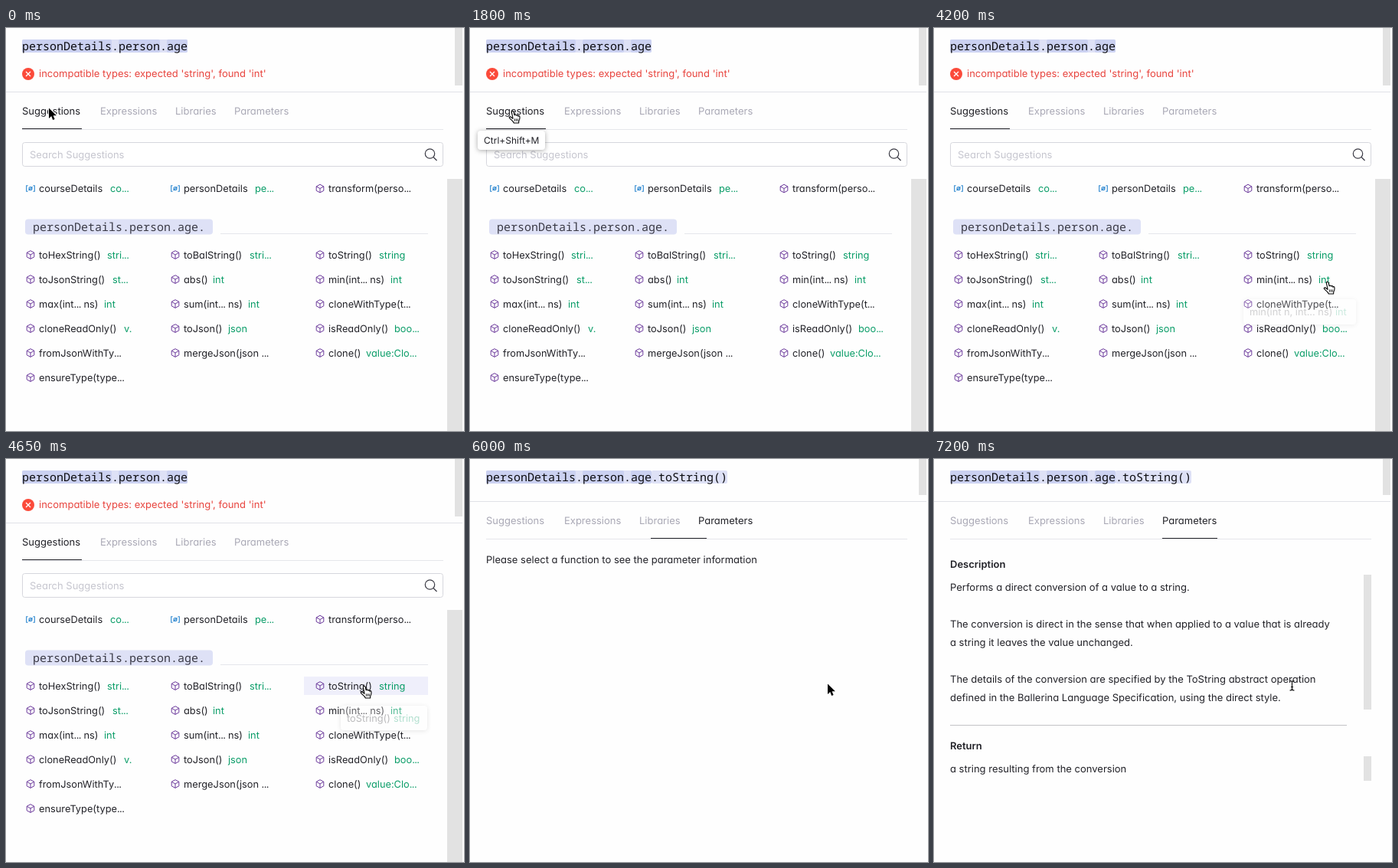
Recreate the animation shown at these times as an HTML page. Size 598 by 526 pixels, loop 8 s.

```html
<!DOCTYPE html>
<html lang="en">
<head>
<meta charset="utf-8">
<style>
  html, body { margin: 0; width: 100%; height: 100%; overflow: hidden; background: #fefefe; }
  svg { display: block; width: 598px; height: 526px; }
  text { font: 13px Inter, sans-serif; font-feature-settings: "cv11"; fill: #222228; white-space: pre; text-rendering: geometricPrecision; }
  .mono { font: 500 15px "Noto Sans Mono", monospace; fill: #0c0c10; }
  .chip { font-weight: 400; fill: #3a3a46; }
  .item { font-size: 12.8px; }
  .dots { letter-spacing: -.6px; }
  .type { fill: #0a9d68; }
  .bold { font-weight: 600; }
  .error { fill: #e8443e; }
  .search { fill: #c6c6cf; }
  .keys { font-size: 12px; }
  .tab { fill: #a9a8b5; }
  .tab.on { fill: #222228; }
  .bar { fill: #e2e2e2; }
  .rule { fill: #e5e6eb; }
  .light { fill: #dee1f6; }
  .dark { fill: #cbd1f1; }
  .hover { fill: #e2e3fa; }
  .cube { fill: none; stroke: #6c3a9c; stroke-linejoin: round; }
  .var { fill: none; stroke: #2b86cf; stroke-width: 1.1; }
  .tip rect { fill: #fff; filter: drop-shadow(0 1px 3px #0005); }
</style>
</head>
<body>
<svg id="stage"></svg>
<script>
const LOOP = 8000;
const COLUMNS = [32, 221, 410];
const HOVER_OPACITY = .52;

// name, type, x of the type
const VARIABLES = [["courseDetails", "co...", 136], ["personDetails", "pe...", 325], ["transform(perso..."]];
const METHODS = [
  ["toHexString()", "stri...", 132], ["toBalString()", "stri...", 318], ["toString()", "string", 487],
  ["toJsonString()", "st...", 139], ["abs()", "int", 270], ["min(int... ns)", "int", 502],
  ["max(int... ns)", "int", 128], ["sum(int... ns)", "int", 316], ["cloneWithType(t..."],
  ["cloneReadOnly()", "v.", 154], ["toJson()", "json", 290], ["isReadOnly()", "boo...", 507],
  ["fromJsonWithTy..."], ["mergeJson(json ..."], ["clone()", "value:Clo...", 470],
  ["ensureType(type..."]
];
const TABS = [["Suggestions", 21], ["Expressions", 123], ["Libraries", 221], ["Parameters", 298]];

// Step tracks: [start time, values...]
const CURSOR = [
  [0, "arrow", 56, 104.5], [600, "hand", 51, 106], [1800, "hand", 50, 107], [1950, "hand", 49, 109],
  [2700, "hand", 49, 110], [2850, "hand", 45, 113], [3000, "hand", 43, 116], [3150, "hand", 42, 116],
  [3900, "hand", 175, 141], [4050, "hand", 496, 314], [4200, "hand", 508, 330], [4350, "hand", 495, 325],
  [4500, "hand", 466, 299], [4650, "hand", 462, 295], [5850, "arrow", 467, 293.5], [7050, "beam", 467.5, 289]
];
const FADES = {
  keysTip: [[0, 0], [750, .3], [900, 1], [4050, .5], [4200, 0]],
  minTip: [[0, 0], [4200, .2], [4350, 1], [4650, 0]],
  stringTip: [[0, 0], [4650, .3], [4800, 1], [6000, 0]],
  minHover: [[0, 0], [4350, 1], [4650, 0]],
  stringHover: [[0, 0], [4650, 1], [5250, 1.6], [5400, 1], [6000, 0]],
  list: [[0, 1], [6000, 0]],
  call: [[0, 0], [6000, 1]],
  hint: [[0, 0], [6000, 1], [7200, 0]],
  details: [[0, 0], [7200, 1]]
};
const UNDERLINE = [[0, 21, 78], [6000, 236, 73], [6150, 298, 72]];

const text = (x, y, s, cls = "") => `<text x="${x}" y="${y}" class="${cls}">${s}</text>`;
const rect = (x, y, w, h, attrs) => `<rect x="${x}" y="${y}" width="${w}" height="${h}" ${attrs}/>`;
const group = (id, body, attrs = "") => `<g id="${id}" ${attrs}>${body}</g>`;
const cube = (x, y) => `<path class="cube" transform="translate(${x} ${y})" d="M0-5.3L4.8-2.7V2.8L0 5.4L-4.8 2.8V-2.7ZM-4.8-2.7L0 0L4.8-2.7M0 0V5.4"/>`;
const bracket = (x, y) => `<path class="var" transform="translate(${x} ${y})" d="M-3.4-3.8H-5.3V3.8H-3.4M3.4-3.8H5.3V3.8H3.4M2 0A2 2 0 1 1-2 0A2 2 0 1 1 2 0M-2.6 2.2L2.6-2.2"/>`;

const tightDots = s => s.replace("...", '<tspan class="dots">...</tspan>');
const item = ([name, type, typeX], i, top, icon) => {
  const x = COLUMNS[i % 3], y = top + 32 * Math.floor(i / 3);
  return icon(x, y) + text(x + 11, y + 4.5, tightDots(name), "item") +
    (type ? text(typeX, y + 4.5, tightDots(type), "item type") : "");
};
const tip = (id, x, y, w, h, body) => group(id, rect(x, y, w, h, 'rx="4"') + body, 'class="tip"');
const hover = (id, y) => group(id, rect(389, y, 162, 24, 'class="hover"'));

const header = group("header",
  rect(586, 0, 10, 75, 'class="bar"') + rect(0, 83, 596, 1, 'fill="#e0e1e7"') +
  TABS.map(([name, x]) => text(x, 113, name, "tab")).join("") +
  rect(21, 132, 550, 1, 'class="rule"') + rect(21, 131, 78, 1, 'id="underline" fill="#222228"'));

const list = group("list",
  `<circle cx="29" cy="60" r="8" fill="#fb4a3a"/><path d="M26 57l6 6m0-6l-6 6" stroke="#fff" stroke-width="1.3"/>` +
  text(43, 64, "incompatible types: expected 'string', found 'int'", "error") +
  rect(21.5, 149.5, 549, 31, 'rx="3" fill="#fff" stroke="#d6d7dd"') +
  text(31, 170, "Search Suggestions", "search") +
  `<g fill="none" stroke="#3c3c46" stroke-width="1.2"><circle cx="553.5" cy="164" r="6.2"/><path d="M558 168.5l4.5 4.5"/></g>` +
  rect(576, 197, 20, 329, 'class="bar"') +
  rect(25, 249.5, 245, 20, 'rx="4" class="light"') + text(35, 264.5, "personDetails.person.age.", "mono chip") +
  rect(280, 268, 271, 1, 'class="rule"') +
  hover("stringHover", 284) + hover("minHover", 316) +
  VARIABLES.map((v, i) => item(v, i, 209.5, i < 2 ? bracket : cube)).join("") +
  METHODS.map((m, i) => item(m, i, 296, cube)).join("") +
  tip("keysTip", 10, 134, 88, 25, text(18, 151, "Ctrl+Shift+M", "keys")) +
  tip("minTip", 404, 354, 147, 33, text(412, 375, 'min(int n, int... ns) <tspan class="type">int</tspan>', "item")) +
  tip("stringTip", 437, 322, 113, 32, text(445, 343, "toString()", "item") + text(506, 343, "string", "item type")));

const details = group("details",
  text(21, 141.5, "Description", "bold") +
  text(21, 171.5, "Performs a direct conversion of a value to a string.") +
  text(21, 219.5, "The conversion is direct in the sense that when applied to a value that is already") +
  text(21, 243.5, "a string it leaves the value unchanged.") +
  text(21, 292, "The details of the conversion are specified by the ToString abstract operation") +
  text(21, 316, "defined in the Ballerina Language Specification, using the direct style.") +
  rect(21, 347, 518, 1, 'fill="#c3c3c6"') +
  text(21, 379, "Return", "bold") + text(21, 409, "a string resulting from the conversion") +
  rect(561, 151, 10, 176, 'class="bar"') + rect(561, 388, 10, 32, 'class="bar"'));

const cursors =
  group("arrow", `<path d="M0 0V13.6L3.2 10.6L5.2 15.5L7.6 14.5L5.6 9.7H9.9Z" fill="#000" stroke="#fff" paint-order="stroke" stroke-width="1.8"/>`) +
  group("hand", `<path d="M5.9 10L4.5 3.6Q4.1 1.4 5.4 1.2Q6.7 1 7.2 3L8.2 7.2Q8.2 6.1 9.3 6Q10.4 6 10.7 7.4Q10.9 6.5 11.8 6.6Q12.8 6.8 13 8Q13.3 7.4 14 7.6Q15 8 15 9.5Q15.2 12 13.8 14.5L13.6 17H7.3Q6.8 15.4 4.8 13.6Q2.6 11.4 1.6 10.6Q.9 9.6 1.8 9Q3 8.6 4.4 10L5.9 11.2Z" fill="#fff" stroke="#000" stroke-width="1.1"/><path d="M8.4 11.4v3.2M10.4 11.4v3.2M12.3 11.4v3.2" stroke="#000" stroke-width=".9"/>`) +
  group("beam", `<path d="M-3 .5Q0 .5 0 2.5V11Q0 13 -3 13M3 .5Q0 .5 0 2.5V11Q0 13 3 13M-1.5 8.5h3" fill="none" stroke="#111" stroke-width="1.2"/>`);

const stage = document.getElementById("stage");
stage.innerHTML =
  rect(21, 15, 216, 17, 'rx="2" class="light"') +
  [[21, 117], [147, 54], [210, 27]].map(([x, w]) => rect(x, 15, w, 17, 'rx="2" class="dark"')).join("") +
  group("call", rect(237, 15, 99, 17, 'rx="2" class="light"') + text(237, 29, ".toString()", "mono")) +
  text(21, 29, "personDetails.person.age", "mono") +
  header + list + group("hint", text(21, 136, "Please select a function to see the parameter information")) +
  details + cursors;

const el = id => document.getElementById(id);
const at = (track, t) => track.findLast(step => step[0] <= t).slice(1);

function draw(now) {
  const t = now % LOOP;
  for (const id in FADES) {
    const [level] = at(FADES[id], t);
    el(id).style.display = level ? "" : "none";
    el(id).style.opacity = id.endsWith("Hover") ? HOVER_OPACITY * level : level;
  }
  const second = t >= 6000;
  el("header").setAttribute("transform", `translate(0 ${second ? -28 : 0})`);
  stage.querySelectorAll(".tab").forEach((tab, i) => tab.classList.toggle("on", i === (second ? 3 : 0)));
  const [lineX, lineWidth] = at(UNDERLINE, t);
  el("underline").setAttribute("x", lineX);
  el("underline").setAttribute("width", lineWidth);
  const [shape, x, y] = at(CURSOR, t);
  for (const id of ["arrow", "hand", "beam"]) el(id).style.display = id === shape ? "" : "none";
  el(shape).setAttribute("transform", `translate(${x} ${y})`);
}

const start = performance.now();
(function tick() {
  draw(performance.now() - start);
  requestAnimationFrame(tick);
})();
</script>
</body>
</html>
```
